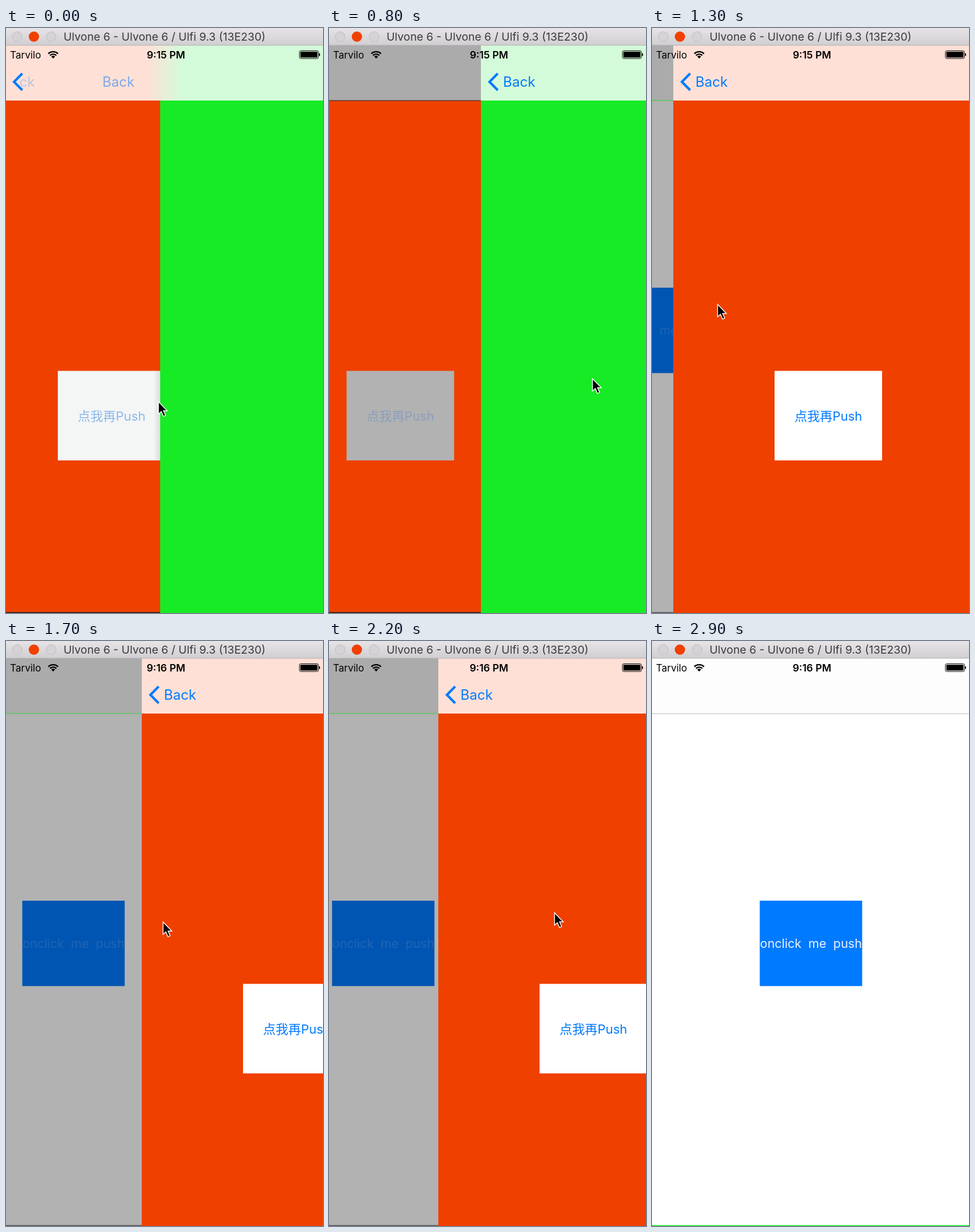
These frames come from a looping animation (551 px wide and 1016 px high, 3 s). An HTML page:

```html
<!DOCTYPE html>
<html lang="en">
<head>
<meta charset="utf-8">
<title>Swipe back navigation</title>
<style>
html, body { margin: 0; width: 551px; height: 1016px; overflow: hidden; background: #fff; }
svg { display: block; }
text { font-family: Inter, "Noto Sans CJK SC", "Noto Sans CJK", sans-serif; white-space: pre; }
</style>
</head>
<body>
<svg width="551" height="1016" viewBox="0 0 551 1016">
  <defs>
    <linearGradient id="chrome" x2="0" y2="1">
      <stop stop-color="#e6e4e6"/><stop offset="1" stop-color="#d0ced0"/>
    </linearGradient>
    <linearGradient id="blend">
      <stop stop-color="#ffe0d6"/><stop offset="1" stop-color="#d4fbd9"/>
    </linearGradient>
    <linearGradient id="shade">
      <stop stop-color="#000" stop-opacity=".02"/><stop offset="1" stop-color="#000" stop-opacity=".1"/>
    </linearGradient>
    <clipPath id="backClip"><rect x="23" y="60" width="200" height="60"/></clipPath>
  </defs>

  <g id="scene"></g>

  <g id="status">
    <text x="7" y="52.5" font-size="17">Tarvilo</text>
    <g fill="none" stroke="#000" stroke-width="2.4">
      <path d="M73.6 44.6a12 12 0 0 1 16.8 0M76.5 47.6a8 8 0 0 1 11 0"/>
      <path d="M82 53l-3.4-3.4a5 5 0 0 1 6.8 0z" fill="#000" stroke="none"/>
    </g>
    <text id="clock" x="278" y="52.5" font-size="17.5" font-weight="600" text-anchor="middle"></text>
    <rect x="510" y="39.5" width="33" height="13.5" rx="2.5" fill="none" stroke="#000"/>
    <rect x="511.7" y="41.2" width="29.6" height="10.1" rx="1"/>
    <path d="M544 43.5q2 .5 2 2.7t-2 2.7z"/>
  </g>

  <path id="cursor" d="M0 0V21.5L4.9 17.2 8.6 25.6 12.4 24 8.8 15.8H15.3Z" stroke="#fff" stroke-width="1.4"/>

  <g id="titlebar">
    <rect width="551" height="30" fill="url(#chrome)"/>
    <rect y="29.5" width="551" height="1" fill="#b4b2b4"/>
    <g fill="#d5d3d5" stroke="#bfbdbf">
      <circle cx="19.5" cy="15" r="8.5"/>
      <circle cx="78.5" cy="15" r="8.5"/>
    </g>
    <circle cx="48.5" cy="15" r="9" fill="#f04000"/>
    <text x="100" y="22" font-size="19.3" fill="#3c3a3c">Ulvone 6 - Ulvone 6 / Ulfi 9.3 (13E230)</text>
  </g>
</svg>
<script>
const W = 551, H = 1016, NAV = 126, LOOP = 3000, STEP = 100;
const RED = '#ef4000', GREEN = '#17eb25', BLUE = '#007aff';
const el = id => document.getElementById(id);

// time, left edge of the top page, cursor x, cursor y
const track = [
  [0, 268, 265, 649], [100, 62, 228, 622], [200, 0, 194, 604],
  [300, 24, 217, 599], [400, 70, 263, 598], [800, 264, 458, 609],
  [900, 335, 529, 606], [1000, 490, 420, 560], [1100, 0, 190, 510],
  [1200, 6, 83, 484], [1300, 37, 114, 480], [1700, 236, 273, 488],
  [1800, 262, 299, 486], [1900, 110, 250, 480], [2000, 0, 203, 475],
  [2100, 92, 294, 473], [2200, 190, 392, 472], [2300, 326, 528, 470],
  [2400, W, 600, 470], [LOOP, W, 600, 470]
];

function sample(t) {
  const i = track.findIndex((k, n) => n && t < k[0]);
  const a = track[i - 1], b = track[i];
  const u = (t - a[0]) / (b[0] - a[0]);
  return [1, 2, 3].map(n => a[n] + (b[n] - a[n]) * u);
}

const rect = (x, y, w, h, fill) =>
  `<rect x="${x}" y="${y}" width="${w}" height="${h}" fill="${fill}"/>`;
const label = (x, y, size, fill, text, extra = '') =>
  `<text x="${x}" y="${y}" font-size="${size}" fill="${fill}" ${extra}>${text}</text>`;
const shift = (x, body) => `<g transform="translate(${x} 0)">${body}</g>`;

const chevron = x =>
  `<path d="M${x + 29.3} 79L${x + 15} 93.5 ${x + 29.3} 108" fill="none" stroke="${BLUE}" stroke-width="4.2"/>`;
const back = (x, extra = '') => label(x, 102.3, 24, BLUE, 'Back', extra);
const navBar = fill => rect(0, 30, W, NAV - 30, fill);
const backBar = fill => navBar(fill) + chevron(0) + back(38.5);
const bottomLine = fill => rect(0, H - 1.5, W, 1.5, fill);

const redBody = (box, ink) =>
  rect(0, NAV, W, H - NAV, RED) +
  rect(176, 595.5, 187, 155.5, box) +
  label(269.5, 681.5, 22, ink, '点我再Push', 'text-anchor="middle"');

const whiteBody = (bg, box, ink) =>
  rect(0, NAV, W, H - NAV, bg) +
  rect(187.3, 451, 178, 148.3, box) +
  label(276.3, 533, 21.4, ink, 'onclick  me  push', 'text-anchor="middle"');

const greenBody = rect(0, NAV, W, H - NAV, GREEN);
const greenPage = backBar('#d4fbd9') + greenBody;
const redPage = backBar('#ffe0d6') + redBody('#fff', BLUE);
const whitePage = navBar('#fdfdfd') + whiteBody('#fff', BLUE, '#eaf3ff') +
  rect(0, 125.7, W, 1, '#b8b8b8') + bottomLine(GREEN);

// Dimmed pages that lie under a dragged one; the bars fill the whole width.
const dimRed = x => shift(x, redBody('#b2b2b2', '#8a9fbc')) +
  navBar('#ababab') + rect(0, 125.5, W, 1, '#222') + bottomLine('#222');
const dimWhite = x => rect(0, NAV, W, H - NAV, '#b2b2b2') +
  shift(x, whiteBody('#b2b2b2', '#0055b2', '#1e65b6')) +
  navBar('#ababab') + rect(0, 125.5, W, 1, '#35d23c') + bottomLine('#555');

function pushScene(edge) {
  const rest = edge / W;
  return rect(0, NAV, W, H - NAV, RED) +
    shift(0.3 * (edge - W) - 1, redBody('#f4f6f6', '#8ab8ec')) +
    bottomLine('#222') +
    rect(edge - 10, NAV + 469.5, 10, 155.5, 'url(#shade)') +
    shift(edge, greenBody) +
    navBar('#ffe0d6') + rect(edge + 36, 30, W, NAV - 30, '#d4fbd9') +
    rect(edge - 23, 30, 60, NAV - 30, 'url(#blend)') +
    `<g clip-path="url(#backClip)">${back(-6, `opacity="${rest * 0.55}"`)}</g>` +
    back(38.5 + rest * 265, `opacity="${1 - rest}"`) + chevron(-1);
}

function sceneAt(t, edge) {
  const under = (edge - 555) / 2;
  if (t < 200) return pushScene(edge);
  if (t < 1100) return dimRed(under) + shift(edge, greenPage);
  if (t < 2400) return dimWhite(under + 0.5) + shift(edge, redPage);
  return whitePage;
}

function render(t) {
  const [edge, x, y] = sample(t);
  el('scene').innerHTML = sceneAt(t, edge);
  el('clock').textContent = t < 1500 ? '9:15 PM' : '9:16 PM';
  el('cursor').setAttribute('transform', `translate(${x} ${y})`);
}

let shown = -1;
function frame(now) {
  const t = Math.floor((now % LOOP) / STEP) * STEP;
  if (t !== shown) render(shown = t);
  requestAnimationFrame(frame);
}
render(0);
requestAnimationFrame(frame);
</script>
</body>
</html>
```
